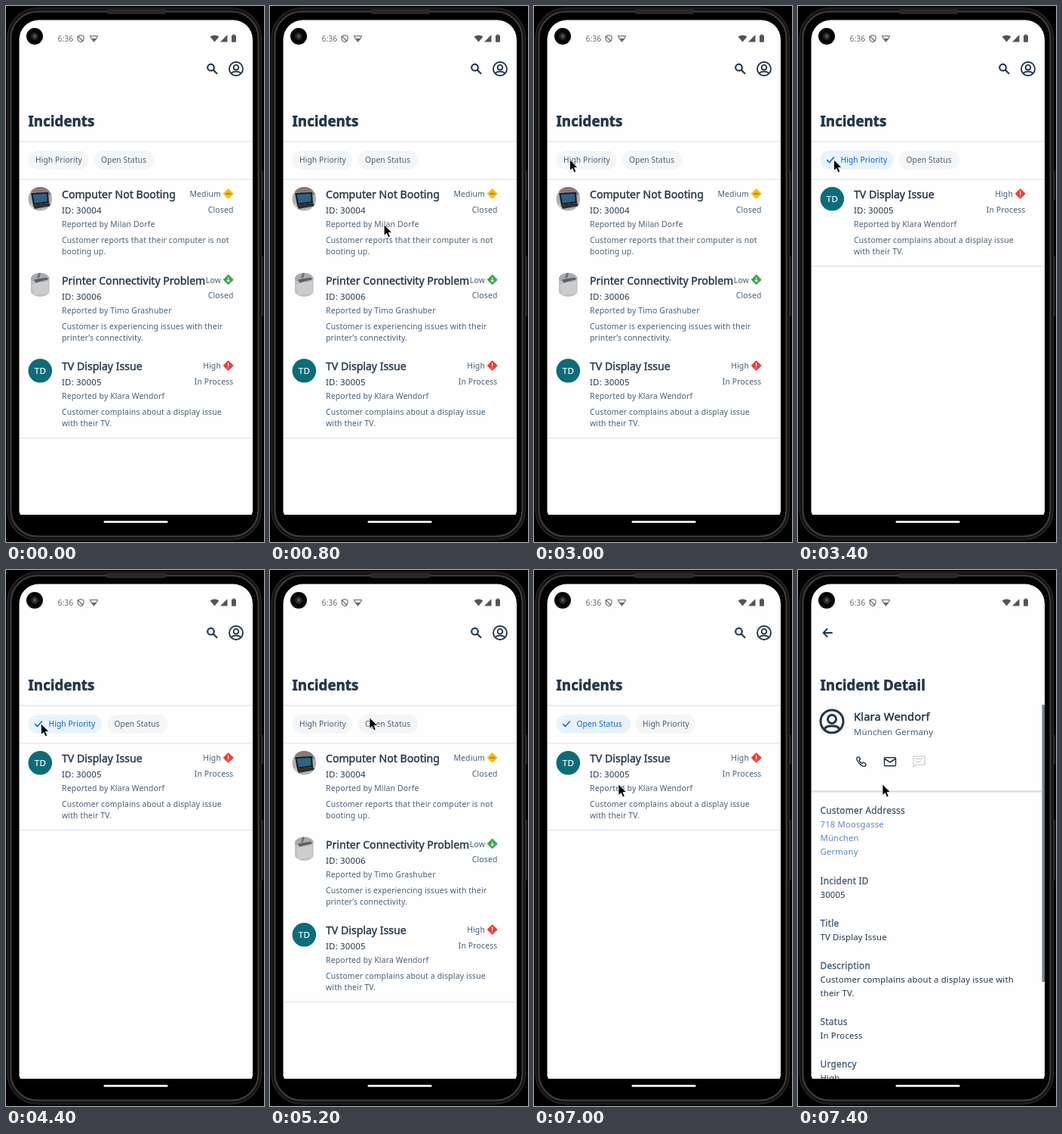
Animation of 342x708 px, one loop 7.6 s. Source, as an HTML page:

```html
<!DOCTYPE html>
<html lang="en">
<head>
<meta charset="utf-8">
<title>Incidents</title>
<style>
html, body { margin: 0; width: 100%; height: 100%; overflow: hidden; background: #000; }
svg { display: block; width: 342px; height: 708px; font-family: "Noto Sans", "Open Sans", sans-serif; }
text { fill: #475e75; font-size: 10.4px; letter-spacing: .17px; white-space: pre; stroke-linejoin: round; }
.h1 { font-size: 18.7px; font-weight: 700; fill: #223548; stroke: #223548; stroke-width: .55px; letter-spacing: .05px; }
/* A thin outline gives the medium weight */
.title { font-size: 14.1px; fill: #223548; stroke: #223548; stroke-width: .4px; letter-spacing: 0; }
.name { font-size: 14.8px; fill: #223548; stroke: #223548; stroke-width: .45px; letter-spacing: .1px; }
.label { font-size: 11.8px; stroke: #475e75; stroke-width: .35px; letter-spacing: .28px; }
.id { font-size: 11.5px; fill: #223548; }
.chip { font-size: 10.2px; letter-spacing: .13px; }
.on { fill: #0064d9; }
.end { text-anchor: end; }
.value { font-size: 11.3px; fill: #223548; }
.sub { font-size: 11.4px; }
.link { font-size: 11.3px; fill: #5d86c5; }
.clock { font-size: 10.4px; fill: #686868; letter-spacing: 0; }
.avatar { font-size: 11.5px; fill: #fff; stroke: #fff; stroke-width: .2px; text-anchor: middle; }
.line { fill: none; stroke: #223548; stroke-linecap: round; stroke-linejoin: round; }
</style>
</head>
<body>
<svg id="stage" viewBox="0 0 342 708"></svg>
<script>
const text = (x, y, s, cls = '') => `<text x="${x}" y="${y}" class="${cls}">${s}</text>`;
const rect = (x, y, w, h, fill, r = 0, more = '') =>
  `<rect x="${x}" y="${y}" width="${w}" height="${h}" rx="${r}" fill="${fill}" ${more}/>`;
const circle = (x, y, r, fill, more = '') => `<circle cx="${x}" cy="${y}" r="${r}" fill="${fill}" ${more}/>`;
const line = (d, w, more = '') => `<path class="line" d="${d}" stroke-width="${w}" ${more}/>`;
const fill = (d, color) => `<path d="${d}" fill="${color}"/>`;
const group = (x, y, s) => `<g transform="translate(${x} ${y})">${s}</g>`;
const rule = (y, color = '#d9dde3') => rect(18, y, 309, 1, color);

// Person in a ring, drawn around 0,0 at radius 9
const person = (x, y, scale, w) => `<g transform="translate(${x} ${y}) scale(${scale})">` +
  line('M-9 0a9 9 0 1 0 18 0a9 9 0 1 0 -18 0M-3.3 -1.8a3.3 3.3 0 1 0 6.6 0a3.3 3.3 0 1 0 -6.6 0M-5.8 6.2C-5 2.8 5 2.8 5.8 6.2', w) + '</g>';

const levels = {
  Medium: ['#fbb913', 'M-3 0H3', '#7a5a10'],
  Low: ['#3fa648', 'M0 -2.5V2.5M-1.7 .9L0 2.6L1.7 .9', '#e4f3e5'],
  High: ['#ef3d36', 'M0 -3.2V.8M0 3V3.1', '#fff']
};
const diamond = level => {
  const [color, mark, ink] = levels[level];
  return group(294.7, 248, rect(-5, -5, 10, 10, color, 1, 'transform="rotate(45)"') +
    `<path d="${mark}" fill="none" stroke="${ink}" stroke-width="1.2" stroke-linecap="round"/>`);
};

const laptop = `<g clip-path="url(#round)">` + rect(29, 239, 33, 32, '#b4aeab') +
  fill('M29 239H62V250L29 245Z', '#8b7a73') + fill('M33 247L56 246L57 260L36 263Z', '#14222f') +
  fill('M35.5 249L54 248L54.5 258L38 260.5Z', '#2d6485') + fill('M35 263L57 260L60 264L38 268Z', '#2c3036') +
  fill('M29 262L35 262L39 271H29Z', '#d9c8bc') + '</g>';
const printer = `<g clip-path="url(#round)">` + rect(33, 239, 24.5, 32, '#bdbfc2', 2) +
  fill('M33 239H57.5V247L33 250Z', '#a9acaf') + fill('M37 248L54 245L56 248L39 252Z', '#5d6166') +
  fill('M35 254L56 250V266L37 269Z', '#cbcdcf') + fill('M43 239H46L44 246L41 246Z', '#6d7278') + '</g>';
const initials = circle(45.3, 254.8, 15.8, '#0b6d7a') + text(45.4, 259, 'TD', 'avatar');

const incidents = [
  [laptop, 'Computer Not Booting', 30004, 'Milan Dorfe', 'Customer reports that their computer is not', 'booting up.', 'Medium', 'Closed'],
  [printer, 'Printer Connectivity Problem', 30006, 'Timo Grashuber', 'Customer is experiencing issues with their', 'printer’s connectivity.', 'Low', 'Closed'],
  [initials, 'TV Display Issue', 30005, 'Klara Wendorf', 'Customer complains about a display issue', 'with their TV.', 'High', 'In Process']
];
const row = ([icon, title, id, by, a, b, level, status], i) => group(0, i * 113.5, icon +
  text(74, 254, title, 'title') + text(74, 274, 'ID: ' + id, 'id') + text(74, 292, 'Reported by ' + by) +
  text(74, 313, a) + text(74, 328, b) + text(285, 252, level, 'end') + text(301.5, 272.5, status, 'end') + diamond(level));

const chip = (x, w, label, on) => rect(x, 191, w, 25, on ? '#e9f3fd' : '#f4f5f7', 12.5) +
  (on ? line('M38.5 203.5L41.6 206.6L47.5 200', 1.5, 'style="stroke:#0064d9"') : '') +
  text(x + (on ? 27 : 9.5), 207, label, on ? 'chip on' : 'chip');

const list = (chips, rows) => text(29.5, 158.5, 'Incidents', 'h1') +
  line('M267.2 81.2a4.3 4.3 0 1 0 8.6 0a4.3 4.3 0 1 0 -8.6 0M274.8 84.5L279.3 89', 2.2) + person(305, 83, 1, 1.9) +
  rule(178.5) + rule(228.5) + chips + rows.map(row).join('') + rule(229 + rows.length * 113.6 + .5);

const field = (y, label, ...values) => text(29.5, y, label, 'label') +
  values.map((v, i) => text(29.5, y + 18 + i * 18.3, v, 'value')).join('');

const detail = line('M45 83H33.8M38.6 78L33.6 83L38.6 88', 1.8) + text(29.5, 158.5, 'Incident Detail', 'h1') +
  person(45, 200, 1.67, 1.8) + text(74, 199, 'Klara Wendorf', 'name') + text(74, 217.5, 'München Germany', 'sub') +
  line('M78 247.6C76.8 252.6 84.5 260.5 89.4 259.2L90 256L86.8 254L85 255.6Q82.2 254.2 81 251.4L82.6 249.8L80.8 246.8Z', 1.4) +
  line('M115.8 247.8H128.2Q129.5 247.8 129.5 249.1V257.4Q129.5 258.7 128.2 258.7H115.8Q114.5 258.7 114.5 257.4V249.1Q114.5 247.8 115.8 247.8M115 249.5L122 254L129 249.5', 1.5) +
  line('M153 246H168V257H157L153 260ZM156 249.5H165M156 253.3H162', 1.1, 'style="stroke:#c0c5ca"') +
  rect(18, 291.5, 305, 1.5, '#d3d5e6') + rect(18, 293, 305, 2, '#f1f1f8') +
  text(29.5, 321.5, 'Customer Addresss', 'label') +
  ['718 Moosgasse', 'München', 'Germany'].map((s, i) => text(29.5, 340 + i * 18.2, s, 'link')).join('') +
  field(414.5, 'Incident ID', '30005') + field(470.5, 'Title', 'TV Display Issue') +
  field(526.5, 'Description', 'Customer complains about a display issue with', 'their TV.') +
  field(601, 'Status', 'In Process') + field(657, 'Urgency', 'High') +
  rect(323.5, 178, 3.5, 366, '#71828f');

const all = list(chip(29.5, 80, 'High Priority') + chip(116.5, 80, 'Open Status'), incidents);
const open = [incidents[2]];
const views = {
  all,
  priority: list(chip(29.5, 97.5, 'High Priority', true) + chip(134, 80, 'Open Status'), open),
  status: list(chip(29.5, 98.5, 'Open Status', true) + chip(134.5, 79.5, 'High Priority'), open),
  detail
};

const statusBar = text(68.5, 46.5, '6:36', 'clock') +
  line('M99 38.6L103 40V43.2Q102.6 46.3 99 47.8Q95.4 46.3 95 43.2V40ZM96 40.5L102 46.5', 1.1, 'style="stroke:#666"') +
  line('M111.5 39.5H121.5L119.5 43.5H113.5Z', 1.1, 'style="stroke:#666"') + fill('M113 43.5H120L116.5 48Z', '#666') +
  fill('M270.5 40.5Q276.5 36.5 282.5 40.5L276.5 47.5Z', '#555') + fill('M293.5 38V47.5H284Z', '#555') +
  rect(299, 38.7, 6, 9, '#555', 1) + rect(300.7, 37.6, 2.6, 2, '#555');

const phone = rect(0, 0, 342, 708, '#000') +
  rect(337, 218, 4, 38, '#222', 1) + rect(337, 330, 4, 80, '#222', 1) +
  rect(2, 2.5, 336.5, 703, '#141414', 40, 'stroke="#2c2b2a" stroke-width="1.2"') +
  rect(6.5, 7.5, 328, 693, '#000', 35, 'stroke="#403f3d" stroke-width="2"') +
  rect(133, 5, 79, 5, '#262626', 2.5, 'stroke="#444" stroke-width=".7"');

document.getElementById('stage').innerHTML =
  `<defs><clipPath id="round">${circle(45.3, 254.8, 15.8, '#000')}</clipPath>
  <clipPath id="screen"><path d="M17.5 44.5A26 26 0 0 1 43.5 18.5H301A26 26 0 0 1 327 44.5V668L325.5 672H19L17.5 668Z"/></clipPath></defs>` +
  phone + '<g clip-path="url(#screen)">' + rect(17, 18, 311, 655, '#fefefe') + statusBar +
  Object.entries(views).map(([id, s]) => `<g id="${id}">${s}</g>`).join('') + '</g>' +
  circle(38, 40, 11, '#050505') + circle(38, 40, 5, '#20242a') + circle(38, 40, 2.4, '#4a515c') +
  rect(129.5, 680, 85, 2.8, '#fff', 1.4) +
  '<path id="cursor" d="M0 0V14.5L3.4 11.5L5.7 16.8L8.2 15.7L5.9 10.5H10.4Z" fill="#000" stroke="#f4f4f4" stroke-width=".8"/>';

// Pointer stops: time, x, y
const stops = [[200, 330, 430], [1200, 54, 212], [1600, 47.5, 203], [4200, 47.5, 203], [4400, 46.5, 203],
  [4600, 46.5, 203], [5200, 132, 195], [6600, 132, 195], [7000, 112, 283], [7600, 112, 283]];
const scenes = [[0, 'all'], [3400, 'priority'], [4600, 'all'], [5800, 'status'], [7400, 'detail']];
const byId = id => document.getElementById(id);
const cursor = byId('cursor');

function pointer(t) {
  const i = stops.findIndex(s => s[0] > t);
  const [t0, x0, y0] = stops[i - 1], [t1, x1, y1] = stops[i];
  const p = (t - t0) / (t1 - t0), e = p * p * (3 - 2 * p);
  return [x0 + (x1 - x0) * e, y0 + (y1 - y0) * e];
}

function draw(now) {
  const t = Math.floor(now % 7600 / 200) * 200;
  const scene = scenes.filter(s => s[0] <= t).pop()[1];
  for (const id in views) byId(id).style.display = id === scene ? '' : 'none';
  cursor.style.display = t < 200 ? 'none' : '';
  if (t >= 200) cursor.setAttribute('transform', `translate(${pointer(t)})`);
}

const start = performance.now();
function tick() {
  draw(performance.now() - start);
  requestAnimationFrame(tick);
}
tick();
</script>
</body>
</html>
```
